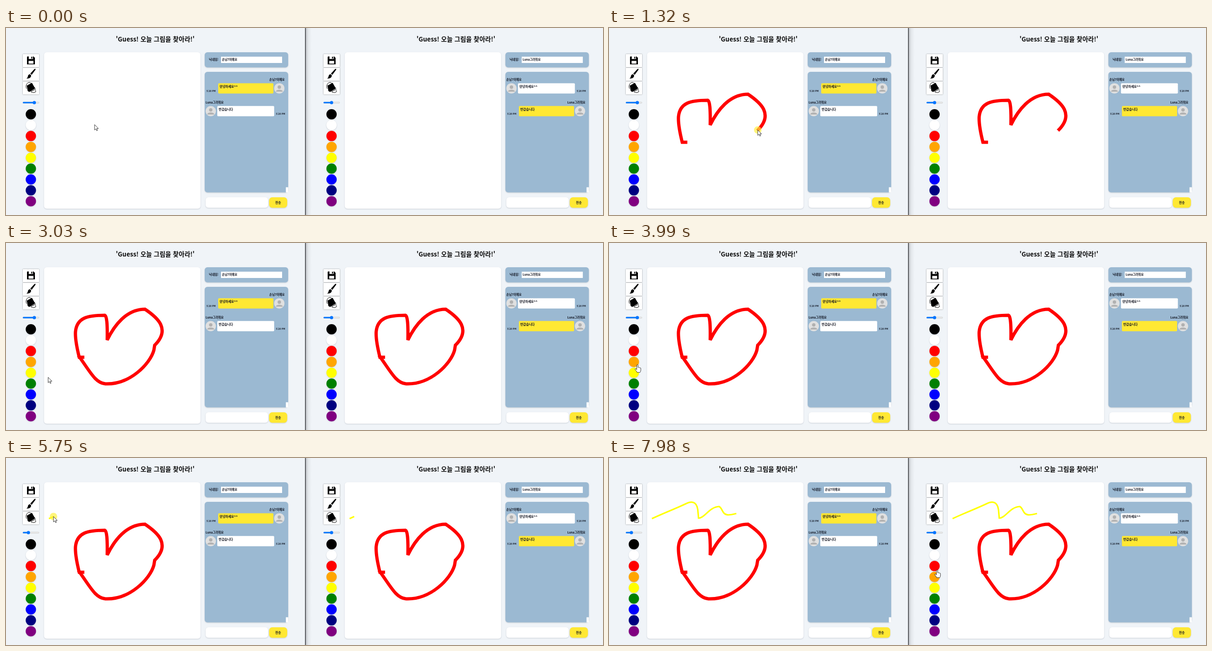
An HTML page for the animation above (8 s loop, 1280 by 401 pixels).

```html
<!DOCTYPE html>
<html lang="ko">
<head>
<meta charset="utf-8">
<title>Drawing room</title>
<style>
  html, body { margin: 0; width: 100%; height: 100%; overflow: hidden; background: #f0f4f8; }
  svg { display: block; width: 100%; height: 100%; }
  text { font: 700 6.7px "Noto Sans CJK KR", "Noto Sans CJK", "Noto Sans", sans-serif; fill: #10131f; }
  .title { font-size: 13.5px; text-anchor: middle; fill: #0a0a0a; }
  .name { font-size: 6.3px; }
  .time { font-size: 5px; }
  .end { text-anchor: end; }
  .mid { text-anchor: middle; }
  .panel { fill: #9bb9d2; }
  .white { fill: #fff; }
  .yellow { fill: #ffe833; }
  .lift { filter: drop-shadow(0 1px 1px rgba(60, 70, 90, .22)); }
  .button { filter: drop-shadow(0 .5px 1px rgba(0, 0, 0, .45)); }
  .ink { fill: none; stroke-miterlimit: 2; }
  .pointer { fill: #fff; stroke: #222; stroke-width: .9; stroke-linejoin: round; }

  /* the brush size drops when the slider is clicked */
  .fill { animation: fill 8s step-end infinite; }
  .thumb { animation: thumb 8s step-end infinite; }
  .still { animation: none; }
  @keyframes fill { 0% { width: 25px; } 62.4% { width: 12px; } }
  @keyframes thumb { 0% { cx: 60.7px; } 62.4% { cx: 48px; } }
</style>
</head>
<body>
<svg viewBox="0 0 1280 401" preserveAspectRatio="none">
  <defs>
    <linearGradient id="edge">
      <stop offset="0" stop-color="#c3c6cb"/>
      <stop offset=".4" stop-color="#e3e7eb"/>
      <stop offset="1" stop-color="#f0f4f8"/>
    </linearGradient>
    <clipPath id="round"><circle r="11"/></clipPath>
    <g id="avatar">
      <circle r="11" fill="#e0e0e0"/>
      <g clip-path="url(#round)" fill="#b1b1b1">
        <circle cy="-2.6" r="3.7"/>
        <path d="M-7.4 7.2C-7.4 1.8 7.4 1.8 7.4 7.2Z"/>
      </g>
    </g>
    <g id="tools">
      <g class="button white">
        <rect x="36" y="56" width="35" height="28" rx="1"/>
        <rect x="36" y="85.2" width="35" height="28" rx="1"/>
        <rect x="36" y="114.4" width="35" height="28" rx="1"/>
      </g>
      <path d="M46 61H59L62 64V78H45V62Z"/>
      <path class="white" d="M48.8 61H57.8V66.4H48.8ZM48.4 70.4H58.8V76.6H48.4Z"/>
      <path d="M54.2 61.6H56.4V65.6H54.2Z"/>
      <path d="M62.8 87.4Q64 88 63 89.8L55 100.4 52 97.8 61 88Z"/>
      <path d="M51 99L54 101.6Q53.4 109 44 108.6 47 106.4 47 103 48 99.4 51 99Z"/>
      <path d="M44.6 123.4L55.6 117.4 62.4 129.6 51.6 136.4Q48 137.4 46.4 134.4Z"/>
      <path d="M44 130C41 124 45 115.6 51.4 116.8 54 117.4 54.4 121 53 124" fill="none" stroke="#000"/>
      <path class="white" stroke="#000" d="M61.4 127.6Q63.6 131 62.4 133.4 65.4 135 63.2 137.2 60 139.6 56.4 138 53.4 138.4 54.2 136 56.8 133.6 59.6 133.8Z"/>
    </g>
  </defs>
  <rect width="1280" height="401" fill="#f0f4f8"/>
  <rect x="643" width="12" height="401" fill="url(#edge)"/>
  <rect x="641" width="2" height="401" fill="#5a5c60"/>
  <g id="left"></g>
  <g id="right" transform="translate(644.7)"></g>
  <circle id="press" r="8" fill="#fff03c" fill-opacity=".68"/>
  <path id="arrow" class="pointer" d="M0 0V11.6L2.7 9.2 4.5 13.2 6.3 12.4 4.6 8.5H8.2Z"/>
  <path id="hand" class="pointer" d="M-1.4 9V1.2Q-1.2 0 0 0 1.2 0 1.3 1.2V6Q2.6 5 3.6 6.4 5 5.6 5.6 7 7.2 6.4 7.2 8.4V12Q7 14.6 5.6 16.6H-.8Q-1.8 13.8-4 11.8-6 9.4-4.6 8.8-3.2 8.4-1.4 10.6Z"/>
</svg>
<script>
const OFFSET = 644.7, LOOP = 8000;
const USERS = ['손님7이에요', 'Luna그려줘요'];
const COLORS = ['black', 'white', 'red', 'orange', 'yellow', 'green', 'blue', 'navy', 'purple'];
const swatchY = i => 185 + i * 23.3;

const RED = { color: '#f00', width: 7 };
const LEMON = { color: '#ff0', width: 3.2 };
const linear = u => u;
const easeOut = u => 1 - (1 - u) ** 1.5;

// Pointer path, in order; legs with ink leave a stroke in both panes
const legs = [
  { from: 0, to: 280, d: 'M190 207L168 245' },
  { from: 280, to: 1320, ink: RED, down: true,
    d: 'M168 245H157C152 225 148 205 149 190 152 160 175 155 212 155Q218 157 217 208' +
       'C232 177 258 142 298 142 325 160 354 185 318 220' },
  { from: 1320, to: 1670, ink: RED, down: true,
    d: 'M319 218L317 230C309 259 266 304 213 302 191 300 180 275 155 241' },
  { from: 1670, to: 2090, down: true, d: 'M155 241L152 233' },
  { from: 2500, to: 3310, d: 'M152 233Q78 325 58 267' },
  { from: 3360, to: 3530, down: true, d: 'M58 267V268' },
  { from: 3660, to: 3730, d: 'M58 268V275' },
  { from: 3930, to: 4800, d: 'M58 275C75 190 118 60 52 172' },
  { from: 4860, to: 4980, d: 'M52 172L48 165' },
  { from: 4980, to: 5130, down: true, d: 'M48 165H48.1' },
  { from: 5220, to: 5730, d: 'M48 165L94 129' },
  { from: 5730, to: 6400, ink: LEMON, down: true, ease: easeOut,
    d: 'M92 130C122 116 142 109 165 98Q190 86 191 118L192 129' +
       'C205 129 215 105 236 104 244 108 242 121 255 122Q262 122 273 119' },
  { from: 6650, to: 6990, d: 'M273 119Q220 130 690 222' },
  { from: 6990, to: 7980, d: 'M690 222C670 300 710 300 715 215S735 150 703.5 240' }
];

const rect = (cls, x, y, w, h, r = 0) =>
  `<rect class="${cls}" x="${x}" y="${y}" width="${w}" height="${h}" rx="${r}"/>`;
const text = (cls, x, y, s) => `<text class="${cls}" x="${x}" y="${y}">${s}</text>`;
const stroke = ({ d, ink }) =>
  `<path class="ink" d="${d}" stroke="${ink.color}" stroke-width="${ink.width}" pathLength="1"/>`;

function message(mine, y, name, body) {
  return text(mine ? 'name end' : 'name', mine ? 597.3 : 428, y - 5, name) +
    `<use href="#avatar" x="${mine ? 586 : 439}" y="${y + 11}"/>` +
    (mine ? rect('yellow', 455, y, 118.3, 22, 2) : rect('white', 453, y, 122, 22, 2)) +
    text('', mine ? 458 : 456, y + 10, body) +
    text('time', mine ? 430 : 579, y + 18.3, '5:20 PM');
}

function slider(still) {
  return '<rect x="36.3" y="158.8" width="34.4" height="2.6" rx="1.3" fill="#efefef" stroke="#b2b2b2" stroke-width=".5"/>' +
    `<rect class="fill ${still}" x="36" y="158.6" width="17" height="3" rx="1.5" fill="#0075ff"/>` +
    `<circle class="thumb ${still}" cx="53.3" cy="160.1" r="3.5" fill="#0075ff"/>`;
}

function pane(user) {
  const swatches = COLORS.map((c, i) =>
    `<circle cx="53.3" cy="${swatchY(i)}" r="11" fill="${c}"/>`).join('');
  return text('title', 320, 29, "'Guess! 오늘 그림을 찾아라!'") +
    '<use href="#tools"/>' + slider(user ? 'still' : '') +
    `<g class="lift">${swatches}</g>` +
    `<g class="lift">${rect('white', 81.5, 52, 335.5, 335.5, 6)}</g>` +
    legs.filter(l => l.ink).map(stroke).join('') +
    `<g class="lift">${rect('panel', 426, 52, 179, 32.5, 6)}${rect('panel', 426, 94, 179, 258.5, 6)}</g>` +
    text('', 435, 70.3, '닉네임:') + rect('white', 461, 61.5, 131, 13.5) +
    text('name', 463, 69.6, USERS[user]) +
    rect('white', 600, 341.5, 5, 11) +
    message(user === 0, 118.4, USERS[0], '안녕하세요^^') +
    message(user === 1, 167.2, USERS[1], '반갑습니다') +
    `<g class="lift">${rect('white', 428, 363, 134, 22.5, 6)}${rect('yellow', 564, 363, 39, 22.5, 7)}</g>` +
    text('mid', 583.5, 376.6, '전송');
}

const $ = id => document.getElementById(id);
const panes = [$('left'), $('right')];
panes.forEach((el, i) => el.innerHTML = pane(i));

for (const leg of legs) {
  leg.track = document.createElementNS('http://www.w3.org/2000/svg', 'path');
  leg.track.setAttribute('d', leg.d);
  leg.length = leg.track.getTotalLength();
}
legs.filter(l => l.ink).forEach((leg, i) => {
  leg.strokes = panes.map(p => p.querySelectorAll('.ink')[i]);
});

function progress({ from, to, ease = linear }, t) {
  return ease(Math.min(1, Math.max(0, (t - from) / (to - from))));
}

function overSwatch(x, y) {
  const cx = x > 642 ? 53.3 + OFFSET : 53.3;
  return COLORS.some((_, i) => Math.hypot(x - cx, y - swatchY(i)) < 11);
}

const show = (el, on) => el.setAttribute('visibility', on ? 'visible' : 'hidden');

function draw(t) {
  for (const leg of legs.filter(l => l.ink)) {
    const part = progress(leg, t);
    for (const s of leg.strokes) {
      s.setAttribute('stroke-dasharray', `${part} 2`);
      show(s, part > 0);
    }
  }
  const leg = legs.findLast(l => l.from <= t);
  const { x, y } = leg.track.getPointAtLength(progress(leg, t) * leg.length);
  const hand = overSwatch(x, y);
  show($('hand'), hand);
  show($('arrow'), !hand);
  show($('press'), leg.down && t < leg.to + 30);
  for (const id of ['press', 'arrow', 'hand']) {
    $(id).setAttribute('transform', `translate(${x} ${y})`);
  }
}

// Slider and pointer share the page's animation clock
const clock = document.getAnimations();
const start = performance.now();
clock.forEach(a => a.startTime = start);
function tick(now) {
  draw(Math.max(0, now - start) % LOOP);
  requestAnimationFrame(tick);
}
draw(0);
requestAnimationFrame(tick);
</script>
</body>
</html>
```
